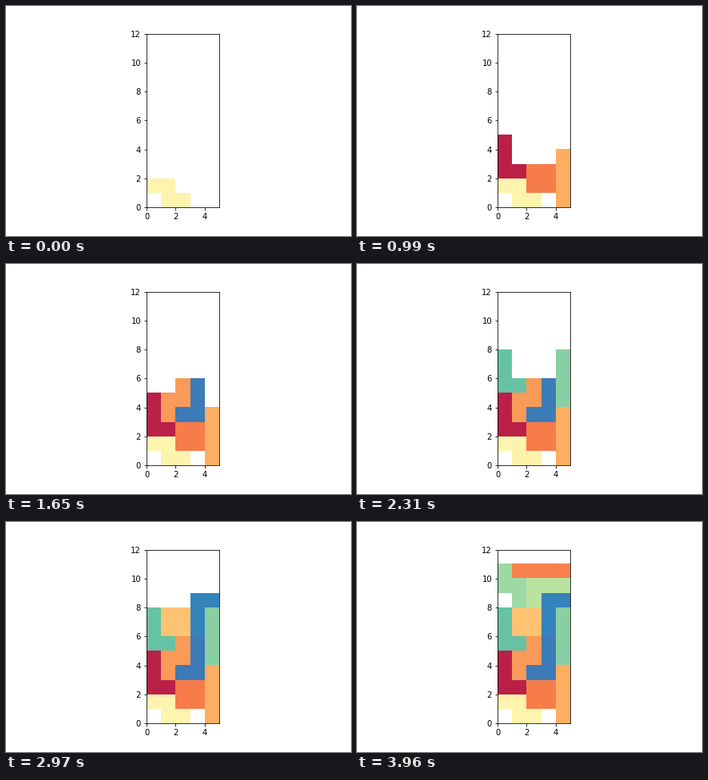
A matplotlib script that plays this animation: 432x288 px, repeating every 4.29 s.

```python
import numpy as np
import matplotlib.pyplot as plt
from matplotlib.animation import FuncAnimation

WIDTH, HEIGHT = 5, 12
STEP_MS = 330

# (x, y, shape, hue): lower-left corner, rows from bottom to top, colormap value
PIECES = [
    (0, 0, (".##", "##."), 0.466),
    (0, 2, ("##", "#.", "#."), 0.052),
    (4, 0, ("#", "#", "#", "#"), 0.302),
    (2, 1, ("##", "##"), 0.223),
    (2, 3, ("##", ".#", ".#"), 0.918),
    (1, 3, ("#.", "##", ".#"), 0.270),
    (4, 4, ("#", "#", "#", "#"), 0.747),
    (0, 5, ("##", "#.", "#."), 0.799),
    (1, 6, ("##", "##"), 0.341),
    (3, 6, ("#.", "#.", "##"), 0.906),
    (2, 8, ("#..", "###"), 0.675),
    (0, 8, (".#", "##", "#."), 0.715),
    (1, 10, ("####",), 0.234),
]


def board(count):
    grid = np.full((HEIGHT, WIDTH), np.nan)
    for x, y, shape, hue in PIECES[:count]:
        for dy, row in enumerate(shape):
            for dx, cell in enumerate(row):
                if cell == "#":
                    grid[y + dy, x + dx] = hue
    return grid


plt.rcParams.update({"font.family": "DejaVu Sans", "font.size": 10})
fig, ax = plt.subplots(figsize=(6, 4), dpi=72)
fig.subplots_adjust(left=0.125, right=0.9, bottom=0.125, top=0.88)

image = ax.imshow(board(1), cmap="Spectral", vmin=0, vmax=1, origin="lower",
                  extent=(0, WIDTH, 0, HEIGHT), interpolation="nearest")
ax.set_xticks(range(0, WIDTH, 2))
ax.set_yticks(range(0, HEIGHT + 1, 2))


def update(i):
    image.set_data(board(i + 1))
    return [image]


anim = FuncAnimation(fig, update, frames=len(PIECES), interval=STEP_MS,
                     repeat=True, repeat_delay=0)
plt.show()
```
